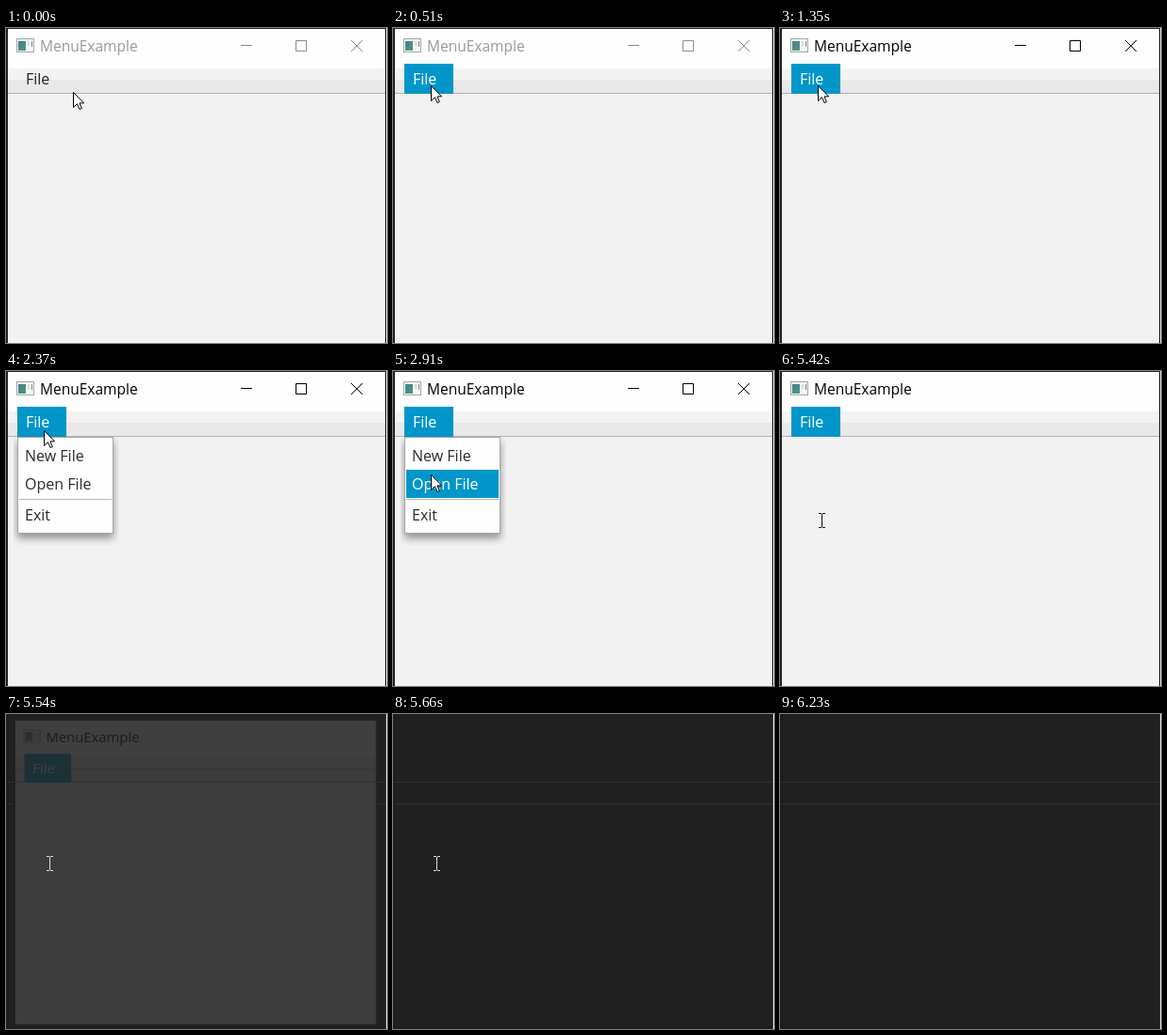
Animation, 404 px wide and 335 px high, one loop 7190 ms. Source, as an HTML page with a canvas:

```html
<!DOCTYPE html>
<html lang="en">
<head>
<meta charset="utf-8">
<title>Menu demo</title>
<style>
  html, body { margin: 0; height: 100%; overflow: hidden; background: #202020; }
  canvas { display: block; }
</style>
</head>
<body>
<canvas id="stage" width="404" height="335"></canvas>
<script>
const ctx = document.getElementById('stage').getContext('2d');
const LOOP = 7190;
const BLUE = '#0096c9', DARK = '#202020';
const FOCUS = 1350, MENU_OPEN = 1500, CLOSING = 5420, FADING = 5540, GONE = 5660, POINTER_OUT = 6230;

// Pointer positions: [time, x, y]; the tip for the arrow, the centre for the text beam.
const path = [
  [0, 71, 68], [120, 67, 66], [270, 55, 63], [390, 45, 61], [510, 40, 61],
  [2370, 40, 63], [2490, 41, 84], [2640, 41, 92], [2790, 41, 104], [2910, 40, 110],
  [3060, 45, 128], [3590, 42, 151], [3740, 42, 158],
  [5420, 44, 159], [5540, 46, 159], [5810, 125, 181], [5930, 278, 239], [6080, 379, 314]
];

// Menu entries: label, top of row, time when the highlight enters and leaves.
const items = [
  ['New File', 75, 2490, 2790],
  ['Open File', 105, 2790, 3590],
  ['Exit', 138, 3590, CLOSING]
];

function rect(x, y, w, h, color) {
  ctx.fillStyle = color;
  ctx.fillRect(x, y, w, h);
}

function text(str, x, y, color, size = 16) {
  ctx.font = `${size}px "Open Sans", "Noto Sans", sans-serif`;
  ctx.fillStyle = color;
  ctx.fillText(str, x, y);
}

function outline(d, color) {
  ctx.strokeStyle = color;
  ctx.lineWidth = 1;
  ctx.stroke(new Path2D(d));
}

function drawDesktop() {
  rect(0, 0, 404, 335, DARK);
  rect(0, 0, 3, 335, '#1d1d1d');
  rect(0, 333, 404, 2, '#1d1d1d');
  rect(0, 72, 404, 1, '#303030');
  rect(0, 95, 404, 1, '#303030');
}

function drawIcon() {
  rect(11, 11, 19, 15, '#a4a8ac');
  rect(12, 12, 17, 13, '#f4f5f6');
  const shade = ctx.createLinearGradient(13, 14, 21, 24);
  shade.addColorStop(0, '#477b9b');
  shade.addColorStop(1, '#4f9d72');
  rect(13, 14, 8, 10, shade);
  rect(23, 14, 2, 5, '#dadde0');
  rect(27, 14, 1, 6, '#7d8995');
}

function drawWindow(t) {
  const active = t >= FOCUS;
  rect(1, 0, 402, 340, '#222');
  rect(2, 1, 400, 42, '#fefefe');
  rect(2, 43, 400, 12, '#f3f3f3');
  rect(2, 55, 400, 14, '#e9e9e9');
  rect(2, 69, 400, 1, '#b2b2b2');
  rect(2, 70, 400, 269, '#f2f2f2');
  drawIcon();
  text('MenuExample', 36, 25, active ? '#000' : '#999', 15.5);
  if (t < CLOSING) {
    outline('M249 18.5h12M307.5 13.5h11v11h-11zM366 13l12 12m0-12l-12 12', active ? '#000' : '#8c8c8c');
  }
  const hot = t >= 270;
  if (hot) rect(12, 38, 52, 32, BLUE);
  text('File', 21, 60, hot ? '#fff' : '#222');
}

function drawMenu(t) {
  ctx.save();
  ctx.shadowColor = 'rgba(0,0,0,.4)';
  ctx.shadowBlur = 8;
  ctx.shadowOffsetY = 5;
  ctx.beginPath();
  ctx.rect(8, 70, 112, 115);
  ctx.clip();
  rect(12, 70, 102, 103, '#a5a5a5');
  ctx.restore();
  rect(13, 71, 100, 101, '#fefefe');
  rect(14, 136, 98, 1, '#b8b8b8');
  for (const [label, top, from, to] of items) {
    const hot = t >= from && t < to;
    if (hot) rect(14, top, 98, 30, BLUE);
    text(label, 20, top + 21, hot ? '#fff' : '#2b2b2b');
  }
}

function drawPointer(t) {
  const [, x, y] = path.findLast(p => p[0] <= t);
  ctx.save();
  ctx.translate(x, y);
  if (t < CLOSING) {
    const arrow = 'M.5 .5V16.5L4.5 12.7L7 18.5L9.3 17.5L6.9 11.9H11.6Z';
    ctx.fillStyle = '#fff';
    ctx.fill(new Path2D(arrow));
    outline(arrow, '#000');
  } else {
    outline('M-3 -7.5h3m1 0h3M-3 7.5h3m1 0h3M.5 -7V7', t < FADING ? '#111' : '#e0e0e0');
  }
  ctx.restore();
}

function draw(t) {
  drawDesktop();
  if (t < FADING) {
    drawWindow(t);
    if (t >= MENU_OPEN && t < CLOSING) drawMenu(t);
  } else if (t < GONE) {
    ctx.save();
    ctx.translate(8, 6);
    ctx.scale(.956, .956);
    drawWindow(t);
    ctx.restore();
    rect(8, 6, 386, 326, 'rgba(32,32,32,.86)');
  }
  rect(0, 0, 1, 335, DARK);
  rect(403, 0, 1, 335, '#d4d4d4');
  if (t < POINTER_OUT) drawPointer(t);
}

const start = performance.now();
function tick() {
  draw((performance.now() - start) % LOOP);
  requestAnimationFrame(tick);
}
tick();
</script>
</body>
</html>
```
